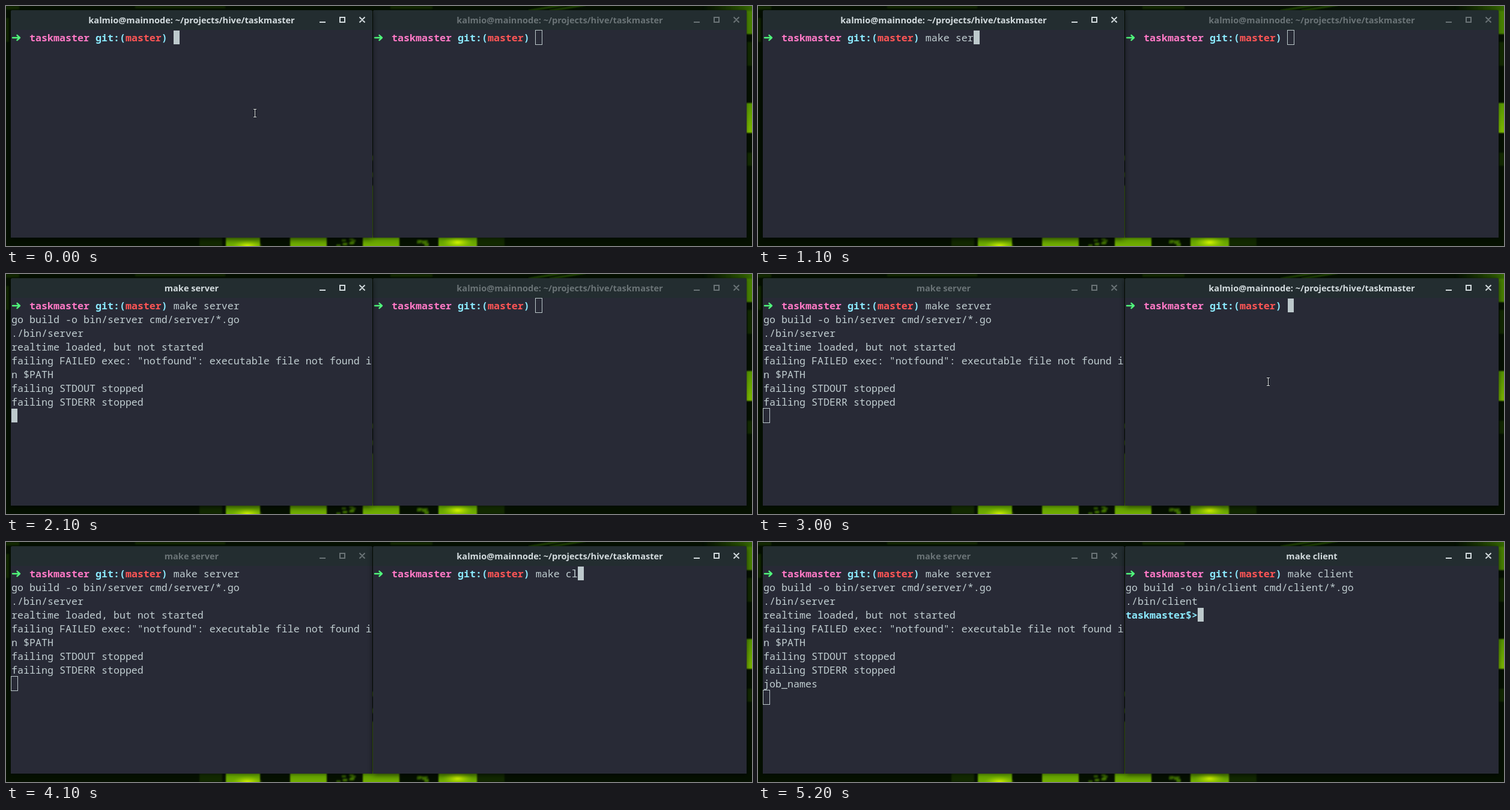
An HTML page for the animation above (8000 ms loop, 1242 by 401 pixels).

```html
<!DOCTYPE html>
<html lang="en">
<head>
<meta charset="utf-8">
<title>Two terminals</title>
<style>
  html, body { margin: 0; width: 100%; height: 100%; overflow: hidden; background: #020500; }
  #stage { position: relative; width: 1242px; height: 401px; overflow: hidden; }
  #wall { position: absolute; left: 0; top: 0; }
  .win {
    position: absolute; top: 7px; height: 380px; z-index: 1;
    background: #282a36; border-radius: 3px 3px 0 0;
    box-shadow: 0 1px 5px rgba(0, 0, 0, .45);
    color: #c1ced1;
  }
  .win.active { z-index: 2; box-shadow: 0 2px 9px rgba(0, 0, 0, .65); }
  .bar {
    position: absolute; left: 0; top: 0; width: 100%; height: 33px;
    background: #232d30; border-radius: 3px 3px 0 0; color: #6a7376;
  }
  .active .bar { color: #d3dbde; }
  .title {
    font: bold 14.55px/33px "Noto Sans", "Open Sans", sans-serif;
    text-align: center; white-space: pre;
  }
  .buttons { position: absolute; right: 9px; top: 9px; overflow: visible; }
  .text {
    position: absolute; top: 34px; margin: 0; white-space: pre;
    font: 16.667px/23px "Noto Sans Mono", "DejaVu Sans Mono", monospace;
    font-variant-ligatures: none;
  }
  .text b { font-weight: bold; }
  .pink { color: #ff79c6; }
  .cyan { color: #8be9fd; }
  .red { color: #ff5555; }
  .arrow { position: absolute; top: 40px; }
  .cursor { position: absolute; box-sizing: border-box; width: 12px; height: 25px; border: 1px solid #bdc9cc; }
  .active .cursor { border-color: transparent; background: #bdc9cc content-box; }
  #mouse { position: absolute; z-index: 3; }
</style>
</head>
<body>
<div id="stage">
  <svg id="wall" width="1242" height="401">
    <defs>
      <filter id="soft" x="-20%" y="-20%" width="140%" height="140%"><feGaussianBlur stdDeviation="1.3"/></filter>
      <linearGradient id="key" x2="0" y2="1"><stop offset="0" stop-color="#569400"/><stop offset="1" stop-color="#7cb800"/></linearGradient>
      <radialGradient id="glow"><stop offset="0" stop-color="#d8f800"/><stop offset="1" stop-color="#9fd400" stop-opacity="0"/></radialGradient>
      <linearGradient id="corner"><stop offset="0" stop-color="#2a5600" stop-opacity="0"/><stop offset="1" stop-color="#3d7600"/></linearGradient>
    </defs>
    <rect width="1242" height="401" fill="#051000"/>
    <g id="blobs" filter="url(#soft)"></g>
  </svg>
  <svg id="mouse" width="7" height="16">
    <path d="M1 1.5h5M3.5 1v14M1 14.5h5" stroke="#111319" stroke-width="2.6"/>
    <path d="M1 1.5h5M3.5 1v14M1 14.5h5" stroke="#e4e8ea"/>
  </svg>
</div>
<script>
const LOOP = 8000, COL = 10, ROW = 23, PROMPT_COLS = 27, ORIGIN = 1;
const HOME = "kalmio@mainnode: ~/projects/hive/taskmaster";
const stage = document.getElementById("stage");
const mouse = document.getElementById("mouse");

const PROMPT = '   <b class="pink">taskmaster</b> <b class="cyan">git:(</b>' +
  '<b class="red">master</b><b class="cyan">)</b> ';

// keys: [time, typed characters]; output: [time, new lines]
const TERMS = [
  {
    x: 8, width: 602, command: "make server ",
    keys: [[0, 0], [100, 1], [200, 2], [400, 3], [600, 4], [700, 5], [900, 6], [1000, 7], [1100, 8], [1400, 12]],
    output: [
      [1700, ["go build -o bin/server cmd/server/*.go"]],
      [2100, [
        "./bin/server",
        "realtime loaded, but not started",
        'failing FAILED exec: "notfound": executable file not found i',
        "n $PATH",
        "failing STDOUT stopped",
        "failing STDERR stopped"
      ]],
      [5200, ["job_names"]]
    ]
  },
  {
    x: 611, width: 622, command: "make client ",
    keys: [[0, 0], [3500, 1], [3600, 2], [3700, 4], [3800, 5], [4100, 7], [4400, 8], [4500, 12]],
    output: [
      [4800, ["go build -o bin/client cmd/client/*.go"]],
      [5200, ["./bin/client"]]
    ],
    shell: [5200, "taskmaster$>"]
  }
];
const FOCUS = [[0, 0], [3000, 1]];
const MOUSE = [[0, [411, 171]], [100, null], [3000, [846, 172]], [3300, null]];

const at = (steps, t) => steps.filter(s => s[0] <= t).pop()[1];

function drawWall() {
  const parts = [];
  const rect = (x, y, w, h, fill, o = 1) =>
    parts.push(`<rect x="${x}" y="${y}" width="${w}" height="${h}" fill="${fill}" opacity="${o}"/>`);
  const glow = (x, y, rx, ry) =>
    parts.push(`<ellipse cx="${x}" cy="${y}" rx="${rx}" ry="${ry}" fill="url(#glow)"/>`);

  // Dim patches along the edges
  for (const [x, y, w, h] of [
    [322, 386, 38, 15], [784, 386, 46, 15], [0, 0, 22, 6], [0, 20, 5, 40],
    [215, 0, 150, 4], [640, 0, 70, 5], [1234, 60, 8, 40], [1234, 245, 8, 22]
  ]) rect(x, y, w, h, "#255000", .4);
  parts.push('<path d="M870 8L930 -2M905 8L965 -2" stroke="#234a00" stroke-width="3"/>');

  // Lit keys below and beside the windows
  for (const [x, w] of [[366, 57], [473, 61], [594, 61], [720, 64]]) rect(x, 383, w, 24, "url(#key)");
  glow(402, 401, 26, 10);
  glow(752, 395, 26, 10);
  rect(1160, -4, 90, 12, "url(#corner)");
  rect(1232, 8, 14, 39, "#467f00");
  rect(1232, 162, 16, 50, "url(#key)");

  // Sliver between the windows
  rect(607, 300, 7, 87, "#4f8800", .9);
  for (const y of [250, 278]) rect(607, y, 7, 8, "#4f8800", .7);

  // Broken spots between the keys
  let seed = 7;
  const rnd = () => (seed = seed * 16807 % 2147483647) / 2147483647;
  for (const [x, w] of [[553, 31], [685, 16]])
    for (let i = 0; i < 9; i++) rect(x + rnd() * w - 3, 387 + rnd() * 12, 7, 4, "#4a8005", .6);
  document.getElementById("blobs").innerHTML = parts.join("");
}

function buildTerm(term) {
  const el = document.createElement("div");
  el.className = "win";
  el.style.cssText = `left:${term.x}px;width:${term.width}px`;
  el.innerHTML = `
    <div class="bar"><div class="title"></div>
      <svg class="buttons" width="78" height="14" fill="none" stroke="currentColor" stroke-width="2">
        <path d="M-1 11H9M33 3h8v8h-8zM65.5 2.5l9 9M74.5 2.5l-9 9"/>
      </svg>
    </div>
    <svg class="arrow" style="left:${ORIGIN}px" width="18" height="14" fill="none" stroke="#50fa7b"
      stroke-width="2.4" stroke-linecap="round" stroke-linejoin="round"><path d="M2 6H14M9.5 1.8L14 6L9.5 10.2"/></svg>
    <pre class="text" style="left:${ORIGIN}px"></pre>
    <div class="cursor"></div>`;
  stage.append(el);
  term.el = el;
  term.title = el.querySelector(".title");
  term.text = el.querySelector(".text");
  term.cursor = el.querySelector(".cursor");
}

function drawTerm(term, t, active) {
  const typed = term.command.slice(0, at(term.keys, t));
  const lines = term.output.filter(o => o[0] <= t).flatMap(o => o[1]);
  const running = lines.length > 0;
  const shell = term.shell && t >= term.shell[0] ? term.shell[1] : "";
  const col = running ? shell.length : PROMPT_COLS + typed.length;
  const row = running ? lines.length + 1 : 0;
  const html = [PROMPT + typed, ...lines, `<b class="cyan">${shell.replace(">", "&gt;")}</b>`].join("\n");

  term.el.classList.toggle("active", active);
  term.title.textContent = running ? term.command.trim() : HOME;
  if (term.html !== html) term.text.innerHTML = term.html = html;
  term.cursor.style.left = ORIGIN + col * COL - 1 + "px";
  term.cursor.style.top = 33 + row * ROW + "px";
}

function draw() {
  const t = performance.now() % LOOP;
  const focus = at(FOCUS, t);
  TERMS.forEach((term, i) => drawTerm(term, t, i === focus));

  const spot = at(MOUSE, t);
  mouse.style.display = spot ? "block" : "none";
  if (spot) [mouse.style.left, mouse.style.top] = spot.map(v => v + "px");
  requestAnimationFrame(draw);
}

drawWall();
TERMS.forEach(buildTerm);
draw();
</script>
</body>
</html>
```
